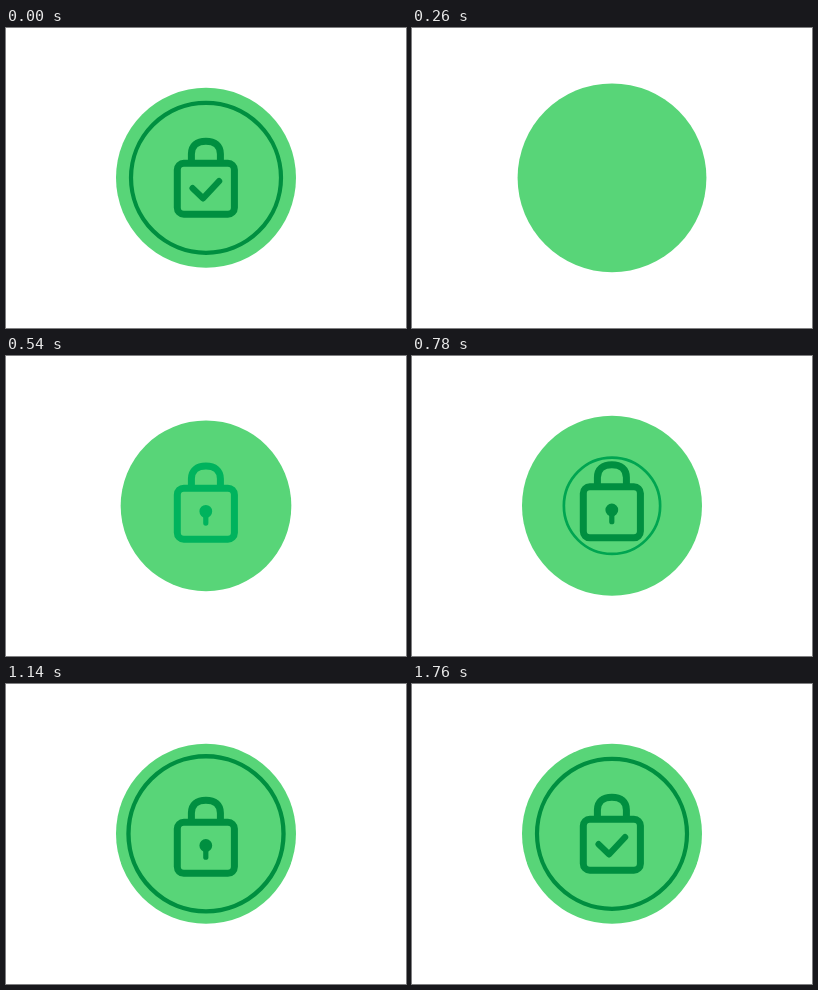
An HTML page for the animation above (2830 ms loop, 400 by 300 pixels).

```html
<!DOCTYPE html>
<html lang="en">
<head>
<meta charset="utf-8">
<title>Secure lock</title>
<style>
  html, body { margin: 0; width: 100%; height: 100%; overflow: hidden; background: #fff; }
  svg { display: block; width: 100%; height: 100%; }
</style>
</head>
<body>
<svg viewBox="0 0 400 300" fill="none" stroke-linecap="round" stroke-linejoin="round">
  <circle id="disc" cx="200" cy="149.8" r="90" fill="#58d578"/>
  <circle id="ring" cx="200" cy="149.8" r="75" stroke-width="4.2"/>
  <g id="lock" stroke-width="7">
    <path stroke-linecap="butt" d="M185.4 135V126C185.4 117.6 191 113.2 199.9 113.2S214.4 117.6 214.4 126V135"/>
    <rect x="171.3" y="135.3" width="57.1" height="51" rx="6.5"/>
  </g>
  <g id="hole">
    <circle cx="199.8" cy="158.5" r="3.2" stroke-width="6.4"/>
    <path d="M199.8 160V170.2" stroke-width="5.2"/>
  </g>
  <path id="check" d="M186.6 160.2L197 170.3L213.1 153.2" stroke-width="6.3"/>
</svg>
<script>
const LOOP = 2830;
const [disc, ring, lock, hole, check] =
  ['disc', 'ring', 'lock', 'hole', 'check'].map(id => document.getElementById(id));

// Eased value from [time, value] keys
function track(t, keys) {
  if (t <= keys[0][0]) return keys[0][1];
  for (let i = 1; i < keys.length; i++) {
    const [t0, a] = keys[i - 1], [t1, b] = keys[i];
    if (t < t1) {
      const x = (t - t0) / (t1 - t0);
      return a + (b - a) * x * x * (3 - 2 * x);
    }
  }
  return keys[keys.length - 1][1];
}

const fade = (t, from, to) => Math.min(1, Math.max(0, (t - from) / (to - from)));

// Blend from disc green to ink; red clips at zero early
function ink(p) {
  const mix = (a, b) => Math.max(0, Math.round(a + (b - a) * p));
  return `rgb(${mix(88, -100)},${mix(213, 143)},${mix(120, 64)})`;
}

function pose(el, { scale = 1, dy = 0, tint = 1 }) {
  el.setAttribute('transform', `translate(200 ${149.8 + dy}) scale(${scale}) translate(-200 -149.8)`);
  if (el !== disc) el.setAttribute('stroke', ink(tint));
  el.setAttribute('visibility', scale > 0.002 && tint > 0 ? 'visible' : 'hidden');
}

function draw(time) {
  const t = time < 20 ? LOOP : time;
  const dy = track(t, [[458, 0], [680, -10], [965, 9.2], [1250, 0]]);
  const tint = fade(t, 458, 630);

  pose(disc, { scale: track(t, [[0, 0], [300, 1.1], [520, 0.946], [690, 1]]) });
  pose(ring, {
    scale: track(t, [[490, 0], [1005, 1.075], [1260, 1]]),
    tint: fade(t, 560, 880)
  });
  pose(lock, { dy, tint });
  pose(hole, {
    dy,
    scale: track(t, [[1260, 1], [1440, 0]]),
    tint: tint * (1 - fade(t, 1270, 1460))
  });
  pose(check, {
    scale: track(t, [[1440, 0], [1620, 1.07], [1760, 1]]),
    tint: fade(t, 1440, 1600)
  });
}

const start = performance.now();
function tick() {
  draw((performance.now() - start) % LOOP);
  requestAnimationFrame(tick);
}
tick();
</script>
</body>
</html>
```
